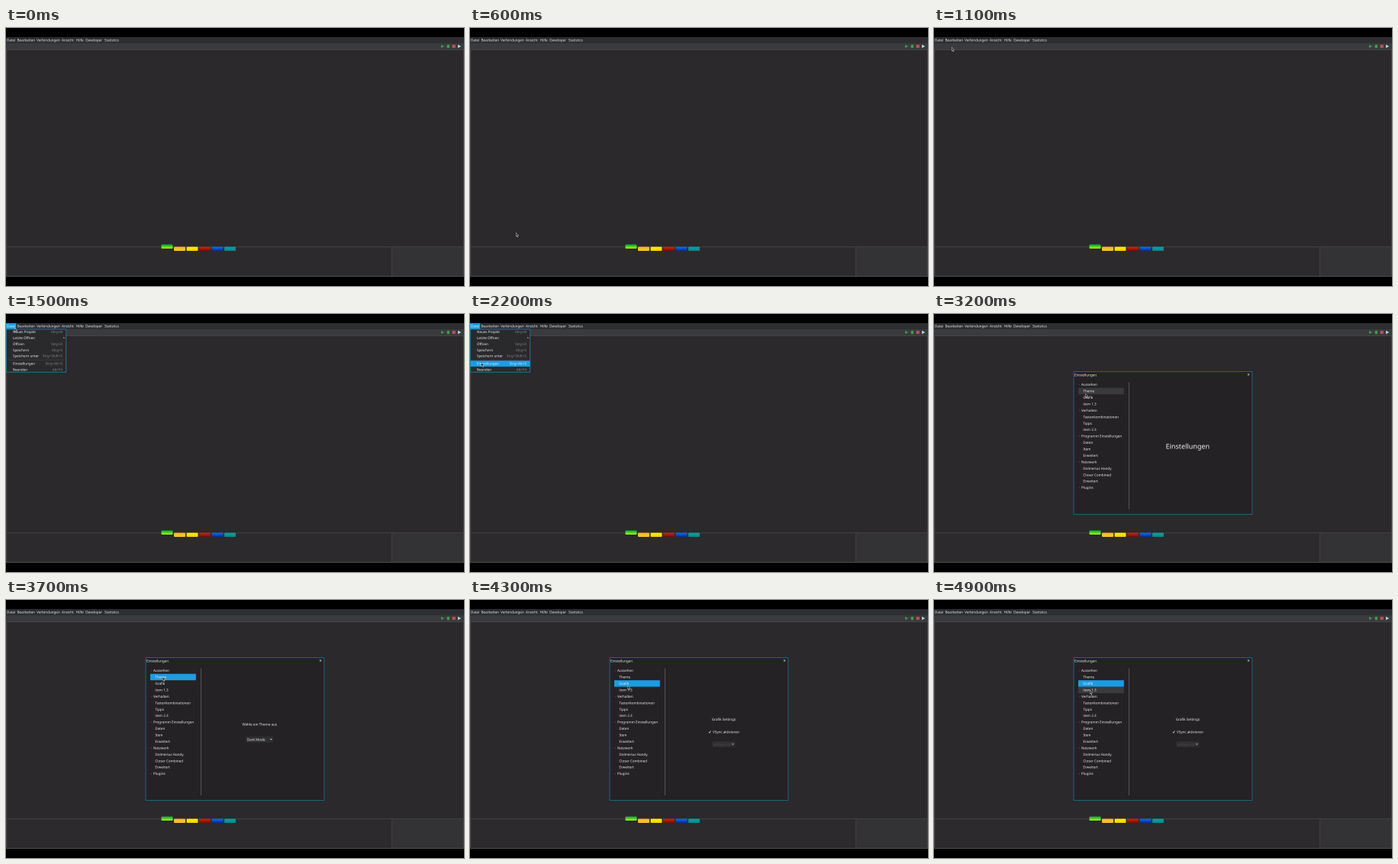
Write an HTML page with a canvas that moves like this. It is 600x338 px and loops after 5 s.

```html
<!DOCTYPE html>
<html lang="de">
<head>
<meta charset="utf-8">
<title>Einstellungen</title>
<style>
html, body { margin: 0; width: 100%; height: 100%; overflow: hidden; background: #000; }
canvas { display: block; width: 100vw; height: 100vh; }
</style>
</head>
<body>
<canvas id="stage"></canvas>
<script>
const W = 600, H = 338, LOOP = 5000, STEP = 100;
const canvas = document.getElementById('stage');
const ctx = canvas.getContext('2d');
// Drawn at double size so tiny type and thin lines land between pixels.
const ratio = 2 * (window.devicePixelRatio || 1);
canvas.width = W * ratio;
canvas.height = H * ratio;

const BLUE = '#1d9ce2', TEXT = '#f0f0f1', FONT = 4.55;

const MENUBAR = [['Datei', 1], ['Bearbeiten', 14.6], ['Verbindungen', 40.2], ['Ansicht', 73],
  ['Hilfe', 91.8], ['Developer', 104.2], ['Statistics', 129]];

const MENU = [['Neues Projekt', 'Strg+N', 23.6], ['Letzte Öffnen', '', 31.4], ['Öffnen', 'Strg+O', 39.3],
  ['Speichern', 'Strg+S', 47.2], ['Speichern unter', 'Strg+Shift+S', 55],
  ['Einstellungen', 'Strg+Alt+S', 65], ['Beenden', 'Alt+F4', 72.8]];

// A leading dash marks a child entry.
const TREE = ['Aussehen', '-Theme', '-Grafik', '-item 1.3', 'Verhalten', '-Tastenkombinationen', '-Tipps',
  '-item 2.3', 'Programm Einstellungen', '-Daten', '-Item', '-Erweitert', 'Netzwerk',
  '-Dolmerius Handy', '-Closer Combined', '-Erweitert', 'Plugins'];
const ROW = 8.44, TREE_TOP = 92.5;

// Pointer path: time, x, y
const PATH = [[100, 31, 288], [300, 50, 285], [500, 50, 285], [600, 60, 268], [700, 60, 228],
  [900, 42, 100], [1100, 23, 25], [1500, 11, 18], [1700, 10.5, 17.5], [2100, 14, 66.5],
  [2200, 14.5, 63.5], [2600, 14.5, 63.5], [2900, 110, 82], [3200, 198, 104], [3500, 205, 101],
  [3700, 205, 100.5], [4200, 206.5, 111], [4300, 206.5, 112], [4500, 205.5, 123.8],
  [4700, 205.5, 123.8], [4900, 204, 118]];

function rect(x, y, w, h, fill) {
  ctx.fillStyle = fill;
  ctx.fillRect(x, y, w, h);
}

function frame(x, y, w, h, fill, line, weight = 0.8) {
  rect(x, y, w, h, fill);
  ctx.strokeStyle = line;
  ctx.lineWidth = weight;
  ctx.strokeRect(x + weight / 2, y + weight / 2, w - weight, h - weight);
}

function shape(points, fill) {
  ctx.beginPath();
  points.forEach(([x, y]) => ctx.lineTo(x, y));
  ctx.closePath();
  ctx.fillStyle = fill;
  ctx.fill();
}

function rounded(x, y, w, h, r, fill) {
  ctx.beginPath();
  ctx.roundRect(x, y, w, h, r);
  ctx.fillStyle = fill;
  ctx.fill();
}

// Laid out large and scaled down so tiny type keeps exact advances.
function label(str, x, y, { size = FONT, color = TEXT, align = 'left' } = {}) {
  ctx.save();
  ctx.translate(x, y + size * 0.36);
  ctx.scale(0.1, 0.1);
  ctx.font = `${size * 10}px "Noto Sans", "Open Sans", sans-serif`;
  ctx.textRendering = 'geometricPrecision';
  ctx.textAlign = align;
  ctx.fillStyle = color;
  ctx.fillText(str, 0, 0);
  ctx.restore();
}

function arrowDown(x, y, color) {
  shape([[x - 1.3, y - 0.7], [x + 1.3, y - 0.7], [x, y + 0.9]], color);
}

function block(x, y, top, bottom) {
  const g = ctx.createLinearGradient(0, y, 0, y + 5.4);
  g.addColorStop(0.2, top);
  g.addColorStop(0.9, bottom);
  rounded(x, y, 15, 5.4, 1, g);
}

function drawWindow(menuOpen) {
  rect(0, 0, W, H, '#000');
  rect(0, 12, W, 314, '#3a3b3e');
  rect(0, 12, W, 8, '#2d2e31');
  rect(0, 28, W, 298, '#454547');
  rect(1.2, 29, 597.6, 257.3, '#2b292b');
  rect(1.2, 287.2, 504, 37.6, '#2c2a2c');
  rect(506, 287.2, 92.8, 37.6, '#333234');

  if (menuOpen) rect(0, 12, 13.4, 8, BLUE);
  MENUBAR.forEach(([name, x]) => label(name, x, 15.9));

  shape([[570, 22], [574.3, 24], [570, 26]], '#3f9a4d');
  rounded(577.6, 21.8, 3.4, 4.5, 1.4, '#3f9a4d');
  rect(584.7, 22, 4, 4, '#c4504e');
  shape([[592, 21.8], [596.2, 24], [592, 26.2]], '#b5d2e2');

  block(203.5, 283.6, '#10bd30', '#a8ea14');
  block(220, 286.6, '#ffb52a', '#ffc235');
  block(236.5, 286.6, '#ffe60a', '#f5d400');
  block(253, 286.6, '#c02408', '#780f02');
  block(269.5, 286.6, '#0a66e6', '#04309a');
  block(286, 286.6, '#0a9c9e', '#088a8c');
}

function drawMenu(pointer) {
  frame(0, 19.6, 79.2, 57, '#2a292c', '#1b86ae');
  rect(1, 59.8, 77.4, 0.6, '#48484b');
  MENU.forEach(([name, keys, y]) => {
    const over = pointer.y > 20.5 && Math.abs(pointer.y - y) <= 3.95;
    if (over) rect(0.8, y - 3.9, 77.6, 7.8, BLUE);
    label(name, 9, y);
    label(keys, 74, y, { align: 'right', color: over ? TEXT : '#858588' });
  });
  shape([[75.4, 30], [77, 31.2], [75.4, 32.4]], '#bbb');
}

function drawTree(selected, pointer) {
  const inside = pointer.x > 189 && pointer.x < 249;
  TREE.forEach((entry, i) => {
    const y = TREE_TOP + i * ROW;
    const child = entry[0] === '-';
    const hovered = inside && Math.abs(pointer.y - y) <= ROW / 2;
    if (i === selected) rect(189, y - 4.2, 59.8, ROW, BLUE);
    else if (hovered) rect(189, y - 4.2, 59.8, ROW, '#3a3a3d');
    if (!child) rect(189.8, y - 0.3, 1, 0.7, '#5c5c60');
    label(child ? entry.slice(1) : entry, child ? 195.4 : 193, y);
  });
}

function drawDialog(selected, pointer) {
  frame(182.7, 75.2, 234.5, 187.6, '#242225', '#1c7f9f', 0.7);
  label('Einstellungen', 184, 79.7);
  label('×', 412, 79.3, { size: 6, align: 'center', color: '#fff' });
  rect(255.2, 89.5, 0.8, 166.5, '#646366');
  drawTree(selected, pointer);

  const mid = { align: 'center' };
  if (selected === 1) {
    label('Wähle ein Theme aus', 332.3, 163, mid);
    rounded(314, 178.8, 36, 8, 0.8, '#302f32');
    label('Dark Mode', 315.8, 183);
    arrowDown(347.2, 182.6, '#ddd');
  } else if (selected === 2) {
    label('Grafik Settings', 332.4, 156.4, mid);
    ctx.beginPath();
    ctx.moveTo(312.9, 172.9);
    ctx.lineTo(313.8, 174.1);
    ctx.lineTo(315.4, 171.5);
    ctx.strokeStyle = '#eee';
    ctx.lineWidth = 0.7;
    ctx.stroke();
    label('VSync aktivieren', 318, 173);
    rounded(317.5, 185.4, 30, 7.2, 0.8, '#303032');
    label('Unbegrenzt', 318.8, 189.2, { color: '#4c4b4e' });
    arrowDown(344.5, 189, '#bbb');
  } else {
    label('Einstellungen', 332.3, 173.4, { size: 9, align: 'center' });
  }
}

function drawPointer({ x, y }) {
  ctx.save();
  ctx.translate(x, y);
  ctx.beginPath();
  [[0.3, 0.4], [0.3, 5], [1.4, 4.1], [2.2, 6], [3, 5.7], [2.2, 3.8], [3.7, 3.6]]
    .forEach(([px, py]) => ctx.lineTo(px, py));
  ctx.closePath();
  ctx.fillStyle = '#19191b';
  ctx.fill();
  ctx.strokeStyle = '#d8d8d8';
  ctx.lineWidth = 0.5;
  ctx.stroke();
  ctx.restore();
}

function pointerAt(t) {
  const next = PATH.findIndex(p => p[0] >= t);
  if (next <= 0) return { x: PATH[0][1], y: PATH[0][2] };
  const [t0, x0, y0] = PATH[next - 1], [t1, x1, y1] = PATH[next];
  const k = (t - t0) / (t1 - t0);
  return { x: x0 + (x1 - x0) * k, y: y0 + (y1 - y0) * k };
}

function draw(t) {
  const pointer = pointerAt(t);
  const menuOpen = t >= 1500 && t < 2500;
  ctx.setTransform(ratio, 0, 0, ratio, 0, 0);
  drawWindow(menuOpen);
  if (menuOpen) drawMenu(pointer);
  if (t >= 2500) drawDialog(t >= 4300 ? 2 : t >= 3700 ? 1 : -1, pointer);
  if (t >= 100) drawPointer(pointer);
}

const start = performance.now();
function tick() {
  const t = (performance.now() - start) % LOOP;
  draw(Math.floor(t / STEP) * STEP);
  requestAnimationFrame(tick);
}
tick();
</script>
</body>
</html>
```
